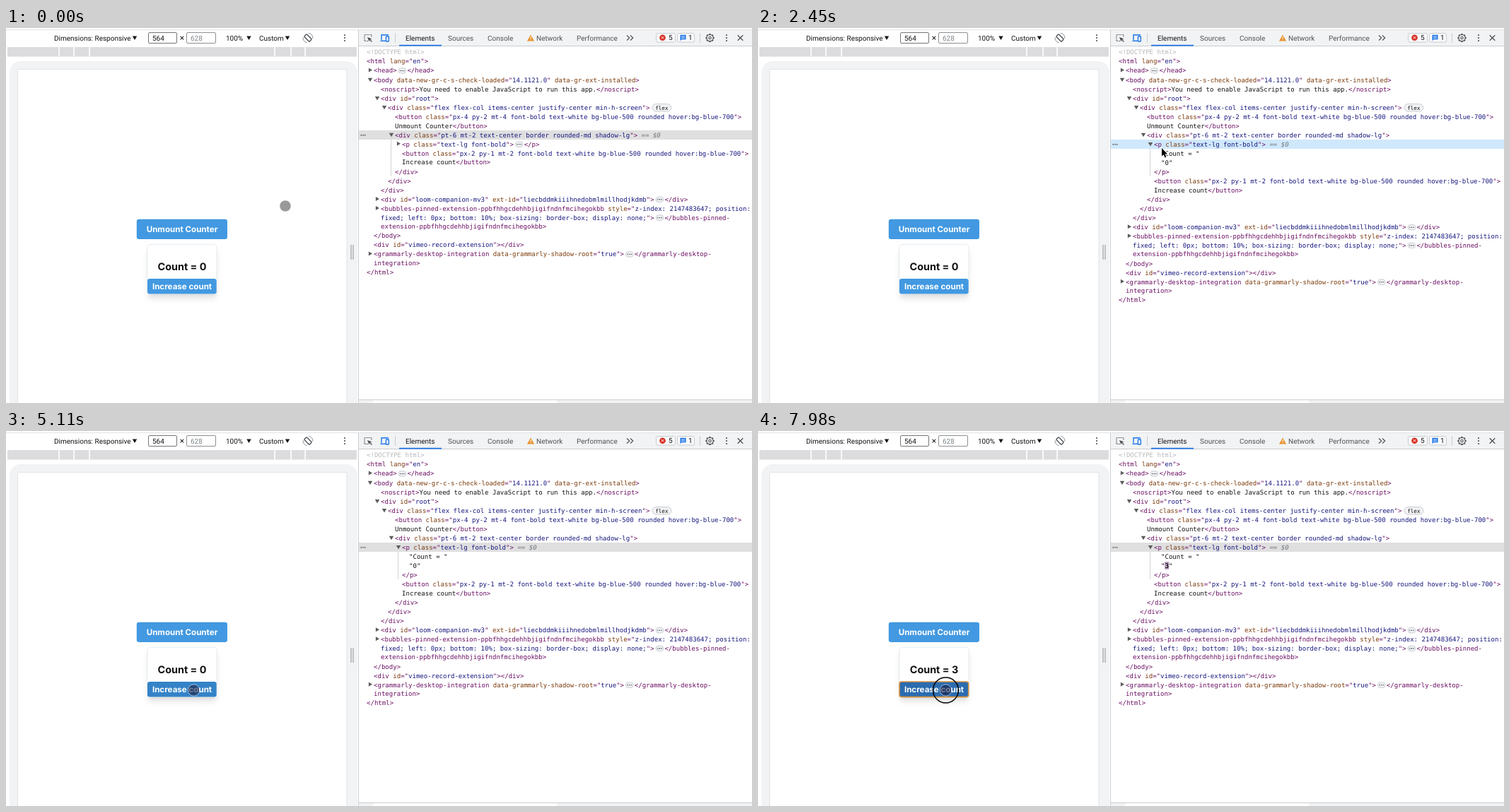
These frames come from a looping animation (1055 px wide and 531 px high, 8 s). An HTML page with a canvas:

```html
<!DOCTYPE html>
<html lang="en">
<head>
<meta charset="utf-8">
<title>Counter in the element inspector</title>
<style>
html, body { margin: 0; width: 100%; height: 100%; overflow: hidden; background: #fff; }
canvas { display: block; }
</style>
</head>
<body>
<canvas id="stage" width="1055" height="531"></canvas>
<script>
const ctx = document.getElementById('stage').getContext('2d');
const LOOP = 8000, STEP = 70;
const MONO = '9.065px "DejaVu Sans Mono", monospace';
const UI = '10px Roboto, sans-serif';
const UI_BOLD = 'bold 10px Roboto, sans-serif';
const PAGE = 'bold 11.6px Inter, sans-serif';
const PAGE_BIG = 'bold 14.4px Inter, sans-serif';
const TAG = '#6c1064', ATTR = '#7d3c0c', VALUE = '#17177f', INK = '#151517', GRAY = '#4f5357', BLUE = '#1a73e8';

// ---- timeline ----
const path = [
  [0, 395, 252], [70, 455, 236], [140, 512, 214], [210, 512, 214], [280, 545, 200], [420, 564, 180],
  [490, 575, 165], [630, 580, 163], [840, 580, 163], [910, 572, 172], [980, 563.5, 169.7], [1120, 566, 173],
  [1260, 580, 163], [1400, 580, 163], [1540, 556, 163], [1610, 556, 163], [1820, 555, 165],
  [1890, 555, 165], [2310, 571, 170], [2450, 571, 170], [2590, 592, 178], [2660, 592, 178],
  [2800, 588, 191], [3000, 590, 192], [3150, 600, 180], [3360, 605, 178], [3710, 605, 178],
  [3780, 575, 222], [3850, 440, 300], [3920, 404, 318], [4550, 274, 366], [4620, 265.5, 367]
];
const hovers = [[0, ''], [280, 'btn'], [420, 'p'], [910, 'btn'], [1190, 'p'], [1960, ''],
  [2520, 'txt'], [2800, 'num'], [3150, 'txt'], [3780, 'btn'], [3850, '']];
const presses = [4860, 5880, 6930, 7910];
const counts = [5180, 6090, 7140];
const OPEN_AT = 1960, TOUCH_AT = 3850, BLUR_AT = 4900, TAP_AT = 5110;

function pointer(t) {
  const i = path.findIndex(k => k[0] > t);
  if (i < 0) return path[path.length - 1].slice(1);
  const [t0, x0, y0] = path[i - 1], [t1, x1, y1] = path[i];
  const f = (t - t0) / (t1 - t0);
  return [x0 + (x1 - x0) * f, y0 + (y1 - y0) * f];
}

// ---- drawing helpers ----
function text(s, x, y, font, color, align = 'left') {
  ctx.font = font;
  ctx.fillStyle = color;
  ctx.textAlign = align;
  ctx.fillText(s, x, y);
  return ctx.measureText(s).width;
}
function rect(x, y, w, h, color) {
  ctx.fillStyle = color;
  ctx.fillRect(x, y, w, h);
}
function box(x, y, w, h, r, fill, stroke, lw = 1) {
  ctx.beginPath();
  ctx.roundRect(x, y, w, h, r);
  if (fill) { ctx.fillStyle = fill; ctx.fill(); }
  if (stroke) { ctx.strokeStyle = stroke; ctx.lineWidth = lw; ctx.stroke(); }
}
function poly(pts, fill, stroke, lw = 1, close = true) {
  ctx.beginPath();
  for (let i = 0; i < pts.length; i += 2) ctx.lineTo(pts[i], pts[i + 1]);
  if (close) ctx.closePath();
  if (stroke) { ctx.strokeStyle = stroke; ctx.lineWidth = lw; ctx.stroke(); }
  if (fill) { ctx.fillStyle = fill; ctx.fill(); }
}
const line = (color, lw, ...pts) => poly(pts, null, color, lw, false);
function circle(x, y, r, fill, stroke, lw = 1) {
  ctx.beginPath();
  ctx.arc(x, y, r, 0, 7);
  if (fill) { ctx.fillStyle = fill; ctx.fill(); }
  if (stroke) { ctx.strokeStyle = stroke; ctx.lineWidth = lw; ctx.stroke(); }
}
function shadow(color, blur, dy, draw) {
  ctx.save();
  ctx.shadowColor = color;
  ctx.shadowBlur = blur;
  ctx.shadowOffsetY = dy;
  draw();
  ctx.restore();
}
const down = (x, y, r, color) => poly([x - r, y - r * .8, x + r, y - r * .8, x, y + r * .9], color);
const right = (x, y, r, color) => poly([x - r * .7, y - r, x + r, y, x - r * .7, y + r], color);
const kebab = (x, y) => [-4, 0, 4].forEach(d => circle(x, y + d, 1.1, GRAY));

// ---- device toolbar and frame ----
function deviceBar() {
  [['Dimensions: Responsive', 68, 182], ['100%', 311, 343.5], ['Custom', 358, 398]].forEach(([s, x, ax]) => {
    text(s, x, 17.6, UI, INK);
    down(ax, 14, 3.2, INK);
  });
  box(201.5, 6.5, 40, 15, 1.5, '#fff', '#767676');
  text('564', 207, 17.6, UI, INK);
  text('×', 249, 18, '12px Roboto, sans-serif', INK, 'center');
  box(255.5, 6.5, 41, 15, 1.5, '#fff', '#8f8f8f');
  text('628', 261, 17.6, UI, '#80868b');
  ctx.save();
  ctx.translate(427, 14);
  ctx.rotate(-Math.PI / 4);
  box(-2.5, -5.2, 5, 10.4, 1, null, GRAY, 1.4);
  ctx.restore();
  for (const a of [-1.4, 1.75]) {
    ctx.beginPath();
    ctx.arc(427, 14, 6.9, a, a + 1.5);
    ctx.stroke();
  }
  kebab(479, 14);
}
function frame() {
  rect(2, 27, 494, 13.5, '#dcdcde');
  [75, 96, 118, 380, 403, 423].forEach(x => rect(x - .7, 27, 1.6, 13.5, '#fff'));
  box(5, 47, 492, 500, [16, 16, 0, 0], '#f1f3f4');
  rect(16, 58, 466, 473, '#fff');
  line('#e0e2e5', 1, 16.5, 531, 16.5, 58.5, 482, 58.5, 482, 531);
  line('#8c8f93', 1, 488, 307, 488, 328);
  line('#8c8f93', 1, 491, 307, 491, 328);
  line('#cacdd1', 1, 498.5, 3, 498.5, 531);
}

// ---- inspector toolbar ----
function inspectorBar() {
  rect(499, 3, 556, 22, '#f1f3f4');
  rect(499, 25, 556, 1, '#cacdd1');
  rect(0, 2, 1055, 1, '#dfe1e5');
  ctx.setLineDash([1.6, 1.2]);
  line(GRAY, 1.2, 512, 18.5, 507, 18.5, 507, 9.5, 517, 9.5, 517, 13);
  ctx.setLineDash([]);
  poly([511, 13, 517.5, 15.3, 514.7, 16.4, 513.3, 19], GRAY);
  line(GRAY, 1.3, 514, 16, 517.5, 19.5);
  line(BLUE, 1.4, 537, 18.3, 529.5, 18.3);
  line(BLUE, 1.4, 531, 17, 531, 9.7, 541, 9.7);
  box(537.4, 12, 4, 7, .8, null, BLUE, 1.3);
  line('#cacdd1', 1, 550.5, 7, 550.5, 21);
  [['Elements', 565], ['Sources', 625], ['Console', 681], ['Network', 750], ['Performance', 807]]
    .forEach(([s, x], i) => text(s, x, 17.8, UI, i ? GRAY : INK));
  rect(556, 23.8, 60, 1.7, BLUE);
  poly([742, 9.5, 747, 18.5, 737, 18.5], '#e8912d');
  rect(741.5, 12.3, 1.1, 3, '#fff');
  rect(741.5, 16.2, 1.1, 1.1, '#fff');
  [878, 883].forEach(x => line(GRAY, 1.2, x, 10.5, x + 3.7, 14, x, 17.5));
  box(919.5, 7.5, 27, 12.5, 2, '#f8f9fa', '#cacdd1');
  circle(928.5, 13.7, 4.3, '#d93025');
  line('#fff', 1, 926.9, 12.1, 930.1, 15.3);
  line('#fff', 1, 930.1, 12.1, 926.9, 15.3);
  text('5', 937, 17.3, UI, INK);
  box(949.5, 7.5, 24, 12.5, 2, '#f8f9fa', '#cacdd1');
  poly([953.5, 9.8, 961.5, 9.8, 961.5, 16.3, 955.5, 16.3, 953.5, 18.3], BLUE);
  line('#fff', .9, 955, 12, 960, 12);
  line('#fff', .9, 955, 14.2, 960, 14.2);
  text('1', 965, 17.3, UI, INK);
  line('#cacdd1', 1, 981.5, 7, 981.5, 21);
  circle(995.5, 14, 4.7, null, GRAY, 1.3);
  circle(995.5, 14, 1.7, null, GRAY, 1.1);
  for (let i = 0; i < 8; i++) {
    const c = Math.cos(i * Math.PI / 4), s = Math.sin(i * Math.PI / 4);
    line(GRAY, 2, 995.5 + c * 4.6, 14 + s * 4.6, 995.5 + c * 6.2, 14 + s * 6.2);
  }
  kebab(1019, 14);
  line(GRAY, 1.3, 1034.7, 10.2, 1042.3, 17.8);
  line(GRAY, 1.3, 1042.3, 10.2, 1034.7, 17.8);
  rect(499, 526, 556, 5, '#f1f3f4');
  rect(519, 527, 260, 4, '#fff');
  rect(499, 526, 556, 1, '#cacdd1');
}

// ---- element tree: depth, arrow, markup, key ----
function tree(open, count) {
  const cls = 'font-bold text-white bg-blue-500 rounded hover:bg-blue-700';
  const para = '<p class="text-lg font-bold">';
  const bubbles = 'bubbles-pinned-extension-ppbfhhgcdehhbjigifndnfmcihegokbb';
  return [
    [0, '', '<!DOCTYPE html>'],
    [0, '', '<html lang="en">'],
    [1, '>', '<head>…</head>'],
    [1, 'v', '<body data-new-gr-c-s-check-loaded="14.1121.0" data-gr-ext-installed>'],
    [2, '', '<noscript>You need to enable JavaScript to run this app.</noscript>'],
    [2, 'v', '<div id="root">'],
    [3, 'v', '<div class="flex flex-col items-center justify-center min-h-screen">', 'flex'],
    [4, '', `<button class="px-4 py-2 mt-4 ${cls}">\nUnmount Counter</button>`],
    [4, 'v', '<div class="pt-6 mt-2 text-center border rounded-md shadow-lg">', 'card'],
    ...(open ? [
      [5, 'v', para, 'p'],
      [6, '', '"Count = "', 'txt'],
      [6, '', `"${count}"`, 'num'],
      [5, '', '</p>']
    ] : [[5, '>', para + '…</p>', 'p']]),
    [5, '', `<button class="px-2 py-1 mt-2 ${cls}">\nIncrease count</button>`, 'btn'],
    [4, '', '</div>'],
    [3, '', '</div>'],
    [2, '', '</div>'],
    [2, '>', '<div id="loom-companion-mv3" ext-id="liecbddmkiiihnedobmlmillhodjkdmb">…</div>'],
    [2, '>', `<${bubbles} style="z-index: 2147483647; position:\nfixed; left: 0px; bottom: 10%; box-sizing: border-box; display: none;">…</${bubbles.replace('pinned-', 'pinned-\n')}>`],
    [1, '', '</body>'],
    [1, '', '<div id="vimeo-record-extension"></div>'],
    [1, '>', '<grammarly-desktop-integration data-grammarly-shadow-root="true">…</grammarly-desktop-\nintegration>'],
    [0, '', '</html>']
  ];
}
function ellipsisPill(x, y) {
  box(x + 2.5, y - 3.4, 10.5, 7.4, 3.5, '#f1f3f4', '#bdc1c6', .8);
  [-2.5, 0, 2.5].forEach(d => circle(x + 7.7 + d, y + .3, .8, GRAY));
}
function markup(src, x0, y) {
  const re = /(<!.+?>)|(<\/?[\w-]+|>)|(…)|(\n)|(="|")|[^<>"…\n=]+|=/g;
  let x = x0, inTag = false, closing = false, inValue = false;
  for (const [s, doctype, tag, dots, wrap, quote] of src.matchAll(re)) {
    if (wrap) { x = x0; y += 12.6; continue; }
    if (dots) { ellipsisPill(x, y); x += 14.7; continue; }
    let color = !inTag ? INK : closing ? TAG : inValue ? VALUE : ATTR;
    if (doctype) color = '#b8b8b8';
    if (tag) { inTag = s !== '>'; closing = s[1] === '/'; color = TAG; }
    if (quote && inTag) { inValue = !inValue; color = TAG; }
    x += text(s, x, y + 3.2, MONO, color);
  }
  return x;
}
function inspector(t, hover, count, flashAge) {
  const open = t >= OPEN_AT, selected = open ? 'p' : 'card';
  let y = 34;
  for (const [depth, arrow, src, key] of tree(open, count)) {
    const x = 510 + depth * 10, h = src.split('\n').length * 12.6 + .5, top = y - 6.5;
    if (key === selected) {
      rect(499, top, 556, h, open && t < BLUR_AT ? '#cfe8fc' : '#dfdfe0');
      [502.3, 505, 507.7].forEach(d => circle(d, y + .3, .9, GRAY));
      line('#d0d3d6', 1, x - 5.5, top + h, x - 5.5, top + h + (open ? 39 : 52));
    } else if (key && key === hover) {
      box(502, top, 550, h, 3, '#ebf1fb');
    }
    if (arrow === 'v') down(x - 5, y, 3.2, '#5c5c5c');
    if (arrow === '>') right(x - 5, y - .7, 3, '#5c5c5c');
    const end = markup(src, x, y);
    if (key === 'flex') {
      box(end + 3.5, y - 5, 27, 10.5, 5.2, '#f1f3f4', '#cacdd1');
      text('flex', end + 17, y + 3, '7.6px "DejaVu Sans Mono", monospace', INK, 'center');
    }
    if (key === selected) text(' == $0', end, y + 3.2, 'italic ' + MONO, '#74797e');
    if (key === 'num' && flashAge < 1400) {
      const g = Math.round(255 * Math.max(0, 1 - flashAge / 700));
      box(x + 5, y - 5.7, 6.4, 11, 1, `rgba(92,36,104,${1 - flashAge / 1400})`);
      text(count, x + 5.45, y + 3.2, MONO, `rgb(${g},${g},${g})`);
    }
    y += h;
  }
}

// ---- page under test ----
function page(t, count) {
  box(184.8, 270.7, 128.2, 28.4, 3.3, '#4299e1');
  text('Unmount Counter', 249, 289.2, PAGE, '#fff', 'center');
  const card = () => box(200.5, 306.5, 97, 70, 4, '#fff');
  shadow('rgba(0,0,0,.1)', 9, 7, card);
  shadow('rgba(0,0,0,.04)', 4, 2.7, card);
  box(200, 306.2, 98, 70.5, 4, '#fff', '#e6ebf1', .9);
  text('Count = ' + count, 249, 342.8, PAGE_BIG, '#111', 'center');
  const fill = t < TAP_AT ? '#4299e1' : t < counts[0] ? '#3483c8' : '#2b6cb0';
  box(200, 355, 97.7, 21.6, 3.3, fill);
  if (t >= counts[0]) box(200, 355, 97.7, 21.6, 3, null, '#d8933f', 1.6);
  text('Increase count', 249, 370.1, PAGE, '#fff', 'center');
}

// ---- hover overlay and its label ----
const content = 'rgba(111,168,220,.66)';
const labels = {
  btn: { x: 200, y: 349, lines: ['button.px-2.py-1.mt-2.font-bol', 'd.text-white.bg-blue-500.round', 'ed.hover:bg-blue-700'], size: '118.16 × 26.2' },
  p: { x: 201, y: 327, w: 96, lines: ['p.text-lg.font-bold'], size: '118.16 × 26.2' },
  txt: { x: 214, y: 328, w: 59, lines: ['#text'], size: '71.5 × 20.5' },
  num: { x: 274, y: 328, w: 9, lines: ['#text'], size: '11.1 × 20.5' }
};
function overlay(hover) {
  const { x, y, w, lines, size } = labels[hover];
  if (hover === 'btn') {
    rect(200, 349, 98, 6, 'rgba(246,178,107,.66)');
    ctx.fillStyle = 'rgba(147,196,125,.6)';
    ctx.beginPath();
    ctx.rect(200, 355, 98, 22);
    ctx.rect(205.5, 358.5, 87, 15);
    ctx.fill('evenodd');
    rect(205.5, 358.5, 87, 15, content);
  } else {
    rect(x, y, w, hover === 'p' ? 22 : 19, content);
  }
  ctx.font = UI_BOLD;
  const nameW = lines.length > 1 ? 160 : ctx.measureText(lines[0]).width;
  ctx.font = UI;
  const boxW = nameW + ctx.measureText(size).width + 27;
  const boxH = 11 + 13 * lines.length, top = y - 7 - boxH;
  poly([x + 8, y - 7, x + 22, y - 7, x + 15, y], '#d9d5d1');
  shadow('rgba(0,0,0,.4)', 6, 1, () => box(x, top, boxW, boxH, 2.5, '#fff'));
  lines.forEach((s, i) => {
    const by = top + 15.6 + i * 13;
    const cut = i ? 0 : /^[#\w]+/.exec(s)[0].length;
    const tagW = text(s.slice(0, cut), x + 7.5, by, UI_BOLD, TAG);
    text(s.slice(cut), x + 7.5 + tagW, by, UI_BOLD, VALUE);
  });
  text(size, x + boxW - 8, top + boxH / 2 + 3.6, UI, GRAY, 'right');
}

// ---- pointer ----
function drawPointer(t) {
  const [x, y] = pointer(t);
  if (t >= 140 && t < TOUCH_AT) {
    const arrow = [0, 0, 0, 11.5, 2.6, 9.2, 4.6, 13.6, 6.4, 12.8, 4.5, 8.6, 8, 8.4];
    poly(arrow.map((v, i) => v + (i % 2 ? y : x)), '#000', '#fff', 1.8);
    return;
  }
  const pressed = t >= BLUR_AT;
  circle(x, y, 7.8, pressed ? 'rgba(18,20,55,.55)' : 'rgba(0,0,0,.4)');
  if (!pressed) return;
  circle(x, y, 8.2, null, 'rgba(225,225,235,.65)', 1);
  for (const p of presses) {
    const age = t - p;
    if (age >= 0 && age < 110) circle(x, y, 26 - 8 * age / STEP, null, '#000', 1.4);
  }
}

function draw(now) {
  const t = Math.floor(now % LOOP / STEP) * STEP;
  const hover = hovers.findLast(h => h[0] <= t)[1];
  const count = counts.filter(c => c <= t).length;
  const flashAge = count ? t - counts[count - 1] : Infinity;
  ctx.textRendering = 'geometricPrecision';
  rect(0, 0, 1055, 531, '#fff');
  deviceBar();
  frame();
  page(t, count);
  inspectorBar();
  inspector(t, hover, count, flashAge);
  if (hover) overlay(hover);
  drawPointer(t);
}

let start;
function tick(now) {
  start ??= now;
  draw(now - start);
  requestAnimationFrame(tick);
}
requestAnimationFrame(tick);
</script>
</body>
</html>
```
